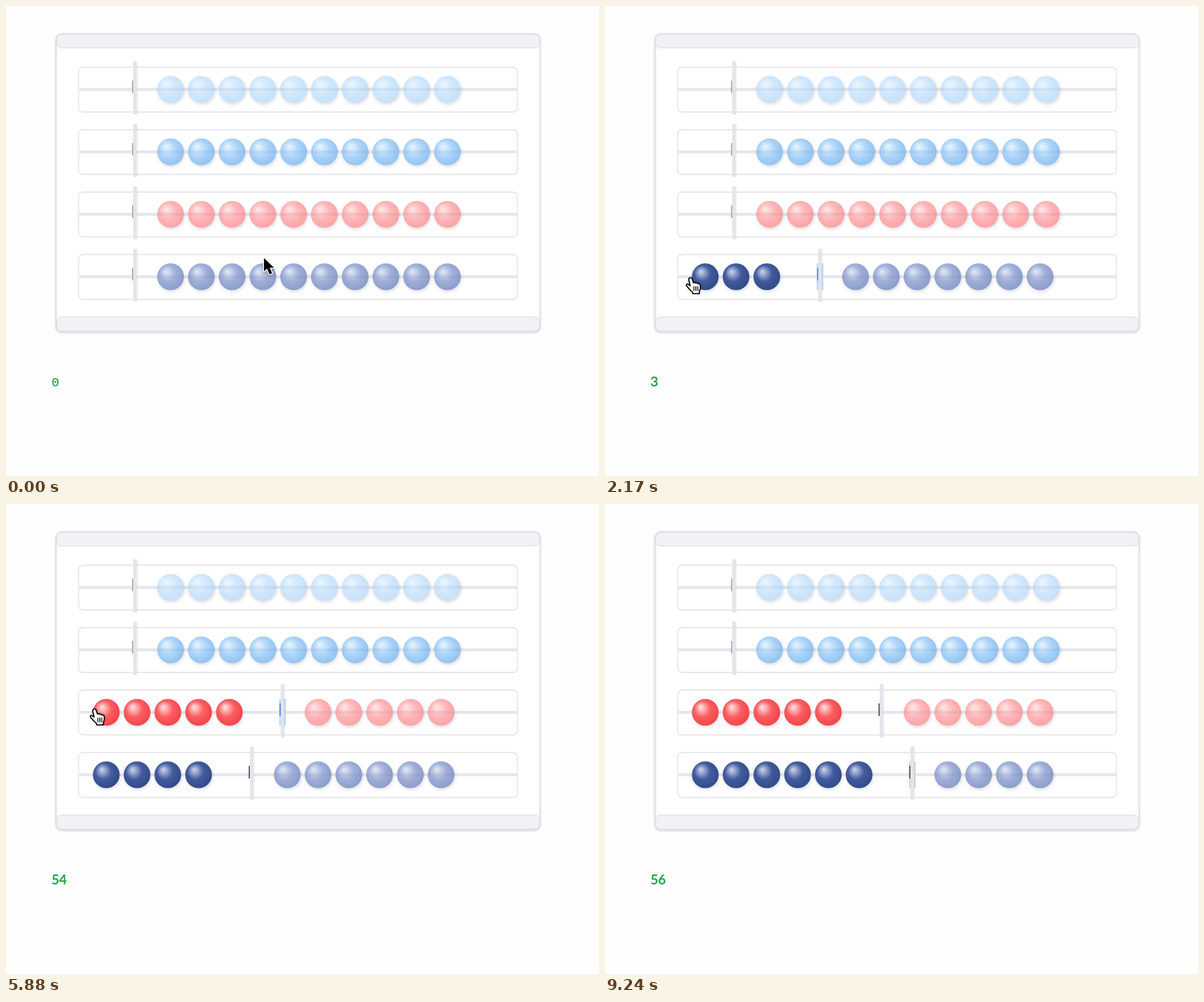
Recreate the animation shown at these times as an HTML page with a canvas. Size 800 by 634 pixels, loop 9.31 s.

```html
<!DOCTYPE html>
<html lang="en">
<head>
<meta charset="utf-8">
<title>Abacus</title>
<style>
  html, body { margin: 0; height: 100%; overflow: hidden; background: #fefefe; }
  canvas { display: block; }
</style>
</head>
<body>
<canvas id="stage" width="800" height="634"></canvas>
<script>
const ctx = document.getElementById('stage').getContext('2d');
const LOOP = 9310, TICK = 70, COUNTER_LAG = 50;
const STEP = 41.5, RADIUS = 18;

// Per row: bead colours as [highlight, body, lower edge].
const ROWS = [
  { pale: ['#e9f5ff', '#d1e8fd', '#c7e1f8'] },
  { pale: ['#e3f3ff', '#acd5fa', '#93c2ee'] },
  { pale: ['#ffe4e4', '#ffb6b8', '#fba3a6'], full: ['#ffdcdc', '#fc5d61', '#f04549'] },
  { pale: ['#dde3f3', '#a0afd9', '#8c9cca'], full: ['#c3cde6', '#425b9f', '#324a85'] }
];
const CLICKS = {
  3: [1235, 1515, 2005, 2425, 7605, 8055],
  2: [4235, 4595, 5085, 5465, 5815]
};
// The second click of a quick pair selects the text next to the bar.
const SELECTIONS = [
  { row: 3, from: 1515, to: 4235 },
  { row: 2, from: 4595, to: 7605 },
  { row: 3, from: 8055, to: LOOP }
];
const BLUR_TIME = 9100;

// Pointer path: [time, x, y]
const PATH = [
  [0, 348, 340], [840, 118, 366], [1120, 114, 366], [2700, 114, 366],
  [3290, 116, 324], [3720, 118, 276], [6300, 118, 276],
  [7280, 129, 349], [7350, 130, 354], [7630, 130, 363],
  [8120, 130, 363], [8540, 190, 640]
];

const HAND = new Path2D('M5 2C6.5 .5 8 1.5 8.6 3L10.5 8.5C11 7.5 13 7.5 13.4 8.8' +
  'C14.5 8 16 8.4 16.4 9.8C18 9 19.5 10 19.6 12C20 15 20 17 18.5 19.5L18.3 23H9.5' +
  'L9 21C6.5 19 3 15 1.2 12.8C0 11 1.5 9.6 3.2 10.4L5.8 12.5L4 4.5C3.8 3.3 4.2 2.5 5 2Z');
const FINGERS = new Path2D('M11 13.5V19M13.6 13.5V19M16.2 13.5V19');
const ARROW = new Path2D('M0 0V18L4.2 14.2L7.5 22L11 20.5L7.7 13H13.5Z');

const rowY = row => 112.5 + 84.25 * row;
const countAt = (row, t) => (CLICKS[row] || []).filter(click => click <= t).length;

function box(x, y, w, h, r, fill, stroke, lineWidth = 1) {
  ctx.beginPath();
  ctx.roundRect(x, y, w, h, r);
  if (fill) { ctx.fillStyle = fill; ctx.fill(); }
  if (stroke) { ctx.strokeStyle = stroke; ctx.lineWidth = lineWidth; ctx.stroke(); }
}

function shadow(color, blur, dx = 0, dy = 0) {
  ctx.shadowColor = color;
  ctx.shadowBlur = blur;
  ctx.shadowOffsetX = dx;
  ctx.shadowOffsetY = dy;
}

function bead(x, y, [light, body, edge], wireShows) {
  const shade = ctx.createRadialGradient(x - 6, y - 7, 1, x - 2, y - 2, 21);
  shade.addColorStop(0, light);
  shade.addColorStop(0.5, body);
  shade.addColorStop(1, edge);
  ctx.save();
  shadow('rgba(70,80,110,.2)', 4, 1, 2);
  ctx.fillStyle = shade;
  ctx.beginPath();
  ctx.arc(x, y, RADIUS, 0, Math.PI * 2);
  ctx.fill();
  ctx.restore();
  if (wireShows) {
    ctx.fillStyle = 'rgba(110,120,150,.1)';
    ctx.fillRect(x - RADIUS, y - 2, RADIUS * 2, 4);
  }
}

function drawFrame() {
  ctx.save();
  shadow('rgba(60,65,80,.16)', 3, 0, 1);
  box(67.5, 37.5, 653, 402, 8, '#fff', '#dfe1e4', 1.5);
  ctx.restore();
  box(68.5, 38.5, 651, 18, 6, '#f0f2f6', '#dcdfe3');
  box(68.5, 419.5, 651, 19, 6, '#f0f2f6', '#dcdfe3');
}

function drawRow(row, t) {
  const y = rowY(row), count = countAt(row, t);
  const bar = count ? 165.5 + STEP * count : 174;
  const firstPale = count ? 213.5 : 222;
  const { pale, full } = ROWS[row];

  box(98, y - 30, 592, 60.5, 6, '#fff', '#e2e4e7', 1.3);
  ctx.fillStyle = '#e6e7ec';
  ctx.fillRect(99, y - 2, 591, 4);

  const selected = SELECTIONS.some(s => s.row === row && t >= s.from && t < s.to);
  if (selected) {
    ctx.fillStyle = t < BLUR_TIME ? '#bfdcf8' : '#d9dbdd';
    ctx.fillRect(bar - 4.5, y - 18, 9, 36);
  }
  ctx.save();
  shadow('rgba(80,85,100,.12)', 2, 1);
  box(bar - 2.3, y - 38, 4.6, 72, 2, '#e2e5ea');
  ctx.restore();
  ctx.fillStyle = !count ? '#a2a4a8' : selected && count < 6 ? '#4e88c4' : '#45484f';
  ctx.fillRect(bar - 4, y - 12, 1.5, 17);

  for (let i = 0; i < 10; i++) {
    if (i < count) bead(135.3 + STEP * i, y, full, false);
    else bead(firstPale + STEP * i, y, pale, true);
  }
}

function drawCounter(t) {
  const total = countAt(2, t - COUNTER_LAG) * 10 + countAt(3, t - COUNTER_LAG);
  ctx.fillStyle = ctx.strokeStyle = '#18a03e';
  ctx.font = total ? '17.5px Lato, sans-serif' : '17px "Liberation Mono", monospace';
  ctx.fillText(total, 61.5, 513);
  ctx.lineWidth = total ? 0.5 : 0.2;
  ctx.strokeText(total, 61.5, 513);
}

function pointerAt(t) {
  const next = PATH.findIndex(key => key[0] > t);
  if (next < 0) return null;
  const [t0, x0, y0] = PATH[next - 1], [t1, x1, y1] = PATH[next];
  const p = (t - t0) / (t1 - t0);
  const ease = next === PATH.length - 1 ? p * p : p * p * (3 - 2 * p);
  return [x0 + (x1 - x0) * ease, y0 + (y1 - y0) * ease];
}

function drawPointer(t) {
  const point = pointerAt(t);
  if (!point) return;
  const [x, y] = point;
  const overBeads = ROWS.some((_, row) => Math.abs(y - rowY(row)) < RADIUS);
  ctx.save();
  ctx.lineJoin = ctx.lineCap = 'round';
  if (overBeads) {
    ctx.translate(x - 5, y - 1);
    ctx.fillStyle = '#fff';
    ctx.strokeStyle = '#000';
    ctx.lineWidth = 1.6;
    ctx.fill(HAND);
    ctx.stroke(HAND);
    ctx.lineWidth = 1.2;
    ctx.stroke(FINGERS);
  } else {
    ctx.translate(x, y);
    shadow('rgba(0,0,0,.3)', 3, 0, 1);
    ctx.strokeStyle = '#fff';
    ctx.lineWidth = 2.6;
    ctx.stroke(ARROW);
    shadow('transparent', 0);
    ctx.fillStyle = '#000';
    ctx.fill(ARROW);
  }
  ctx.restore();
}

function render(now) {
  const t = Math.floor((now % LOOP) / TICK) * TICK;
  ctx.fillStyle = '#fefefe';
  ctx.fillRect(0, 0, 800, 634);
  drawFrame();
  ROWS.forEach((_, row) => drawRow(row, t));
  drawCounter(t);
  drawPointer(t);
}

let start;
function loop(now) {
  start ??= now;
  render(now - start);
  requestAnimationFrame(loop);
}
render(0);
requestAnimationFrame(loop);
</script>
</body>
</html>
```
